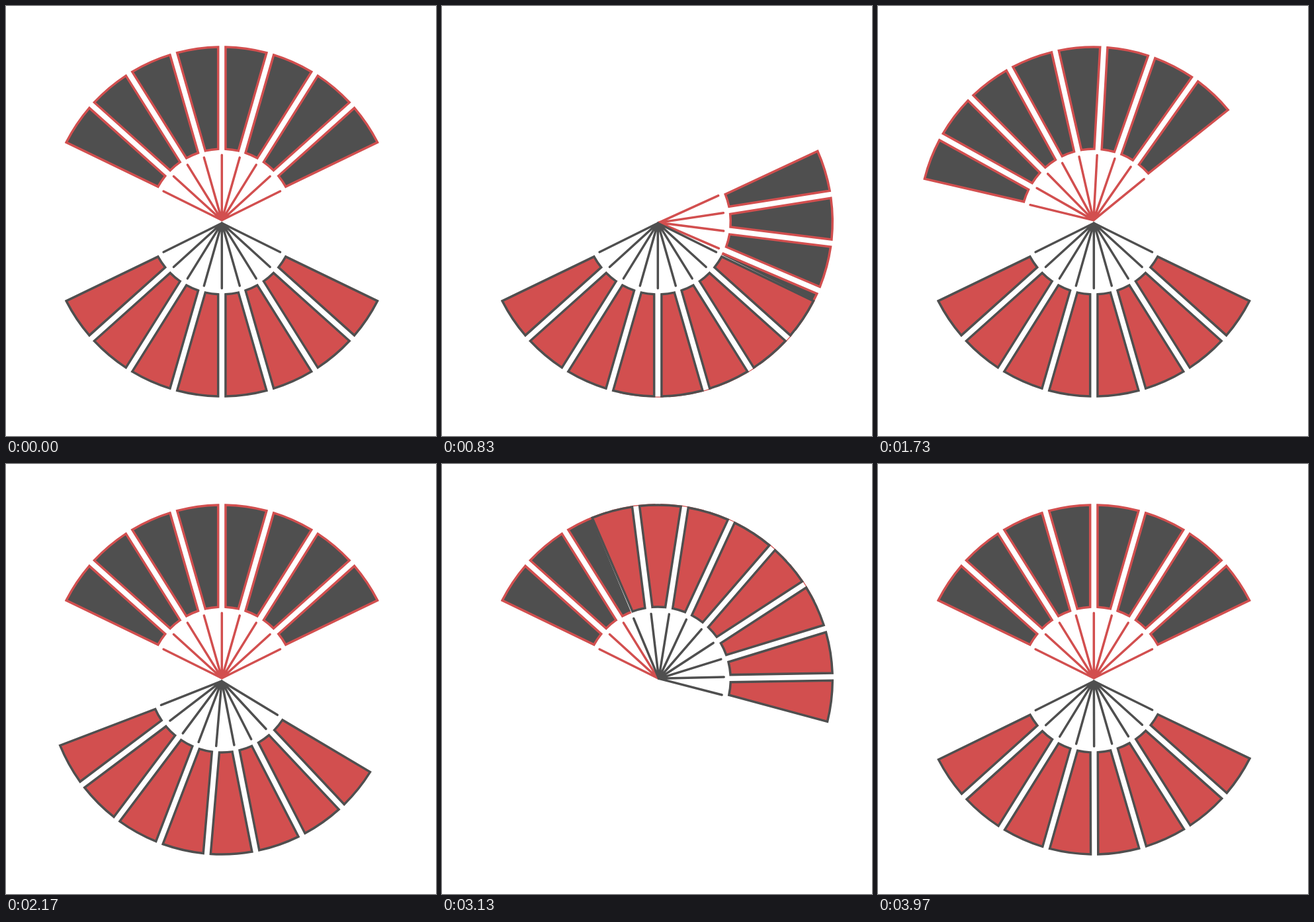
An HTML page with a canvas that plays this animation: 650 px wide and 650 px high, repeating every 4000 ms.

```html
<!DOCTYPE html>
<html>
<head>
<meta charset="utf-8">
<style>
html, body { margin: 0; height: 100%; overflow: hidden; background: #fff; }
canvas { display: block; }
</style>
</head>
<body>
<canvas id="stage" width="650" height="650"></canvas>
<script>
const ctx = document.getElementById('stage').getContext('2d');
const RED = '#d24f4f', GREY = '#4f4f4f';
const CX = 326.3, CY = 326, APEX = 2.2;
const OUTER = 264, INNER = 110, SPOKE = 98.5, GAP = 5.6;
const FPS = 30, FRAMES = 120;
const rad = deg => deg * Math.PI / 180;
const BLADE_STEP = rad(16.05), SPOKE_STEP = rad(15.9);
const UP = -Math.PI / 2;

// cubic-bezier(.42, 0, .58, 1)
function easeInOut(x) {
  let lo = 0, hi = 1;
  for (let i = 0; i < 30; i++) {
    const s = (lo + hi) / 2, r = 1 - s;
    if (1.26 * s * r * r + 1.74 * s * s * r + s * s * s < x) lo = s;
    else hi = s;
  }
  return lo * lo * (3 - 2 * lo);
}

// Blade whose straight sides run parallel to the radii that bound it
function blade(from, to) {
  const far = Math.asin(GAP / OUTER), near = Math.asin(GAP / INNER);
  ctx.beginPath();
  ctx.arc(0, 0, OUTER, from + far, to - far);
  ctx.arc(0, 0, INNER, to - near, from + near, true);
  ctx.closePath();
  ctx.fill();
  ctx.stroke();
}

function fan(angle, fill, line) {
  ctx.save();
  ctx.translate(CX, CY);
  ctx.rotate(angle);

  // White backing hides whatever lies below
  const spread = rad(63.2);
  ctx.fillStyle = '#fff';
  ctx.beginPath();
  ctx.moveTo(0, -APEX);
  ctx.arc(0, 0, OUTER + 0.5, UP - spread, UP + spread);
  ctx.fill();

  ctx.fillStyle = fill;
  ctx.strokeStyle = line;
  ctx.lineWidth = 3.5;
  ctx.lineCap = 'round';
  for (let i = -4; i < 4; i++) blade(UP + i * BLADE_STEP, UP + (i + 1) * BLADE_STEP);

  // The spokes meet just above the pivot
  ctx.beginPath();
  for (let i = -4; i <= 4; i++) {
    const a = UP + i * SPOKE_STEP;
    ctx.moveTo(0, -APEX);
    ctx.lineTo(SPOKE * Math.cos(a), SPOKE * Math.sin(a) - APEX);
  }
  ctx.stroke();
  ctx.restore();
}

function draw() {
  const step = Math.floor(performance.now() * FPS / 1000 + 0.11) % FRAMES;
  const half = FRAMES / 2;
  const turn = easeInOut(step % half / half) * 2 * Math.PI;
  const first = step < half;
  ctx.clearRect(0, 0, 650, 650);
  fan(first ? turn : 0, GREY, RED);
  fan(Math.PI + (first ? 0 : turn), RED, GREY);
  requestAnimationFrame(draw);
}
draw();
</script>
</body>
</html>
```
